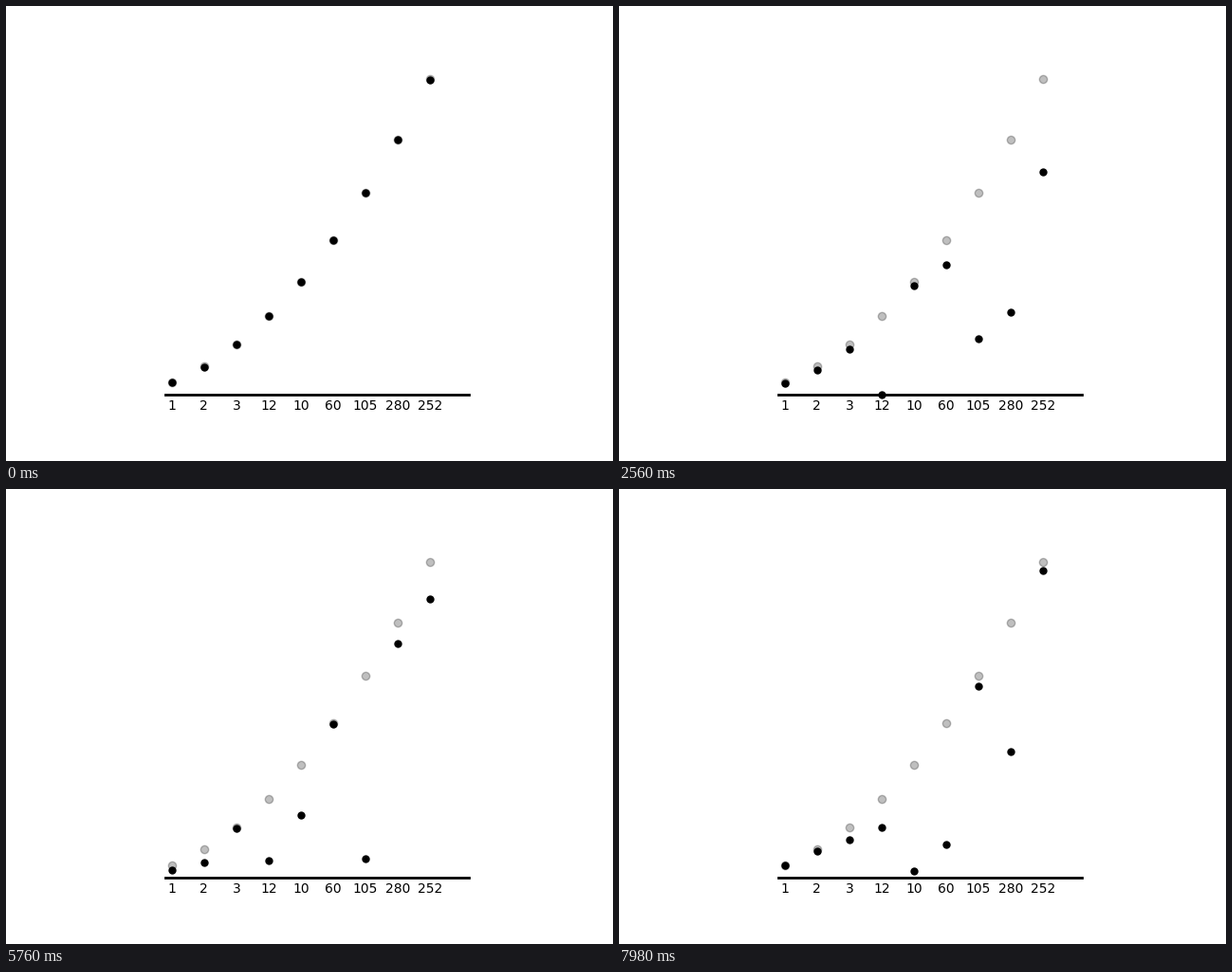
A matplotlib script for the animation above (8 s loop, 640 by 480 pixels).

```python
import math

import matplotlib.pyplot as plt
from matplotlib.animation import FuncAnimation

W, H, DPI = 640, 480, 100
FRAMES, INTERVAL = 400, 20
FLOOR = 69.6              # height of the ground line, px from the bottom
HALF_G = 0.1332           # px per squared step
SIZES = range(2, 11)      # a ball of size m falls for 5 * m steps
XS = [174.8 + 34.04 * i for i in range(len(SIZES))]


def height(m, d):
    """Height of ball m, d steps away from the top of its arc."""
    return FLOOR + HALF_G * ((5 * m) ** 2 - d ** 2)


def bounce(m, frame):
    """Steps away from the top, including the short rest on the ground."""
    first_rest = 2 if m in (2, 9, 10) else 1
    rest = 1 if m < 5 else 2
    step = frame + 1
    if step >= 10 * m + first_rest:
        step = (step - 10 * m - first_rest) % (10 * m + rest)
    else:
        rest = first_rest
    fall, period = 5 * m, 10 * m + rest
    if rest == 1 and step == fall:
        return fall - 1
    return min(step, period - step, fall)


fig = plt.figure(figsize=(W / DPI, H / DPI), dpi=DPI, facecolor="white")
ax = fig.add_axes([0, 0, 1, 1])
ax.set_xlim(0, W)
ax.set_ylim(0, H)
ax.axis("off")

ax.plot([168, 488], [FLOOR, FLOOR], color="black", lw=2)
ax.plot(XS, [height(m, 0) for m in SIZES], "o", color="black", ms=6, alpha=0.25)
balls, = ax.plot([], [], "o", color="black", ms=5)

for x, m in zip(XS, SIZES):
    cycles = math.lcm(*range(1, m + 1)) // m
    ax.text(x, 57.5, str(cycles), ha="center", va="center",
            fontsize=10, family="DejaVu Sans")


def update(frame):
    balls.set_data(XS, [height(m, bounce(m, frame)) for m in SIZES])
    return balls,


anim = FuncAnimation(fig, update, frames=FRAMES, interval=INTERVAL,
                     repeat=True, repeat_delay=0, blit=True)
plt.show()
```
